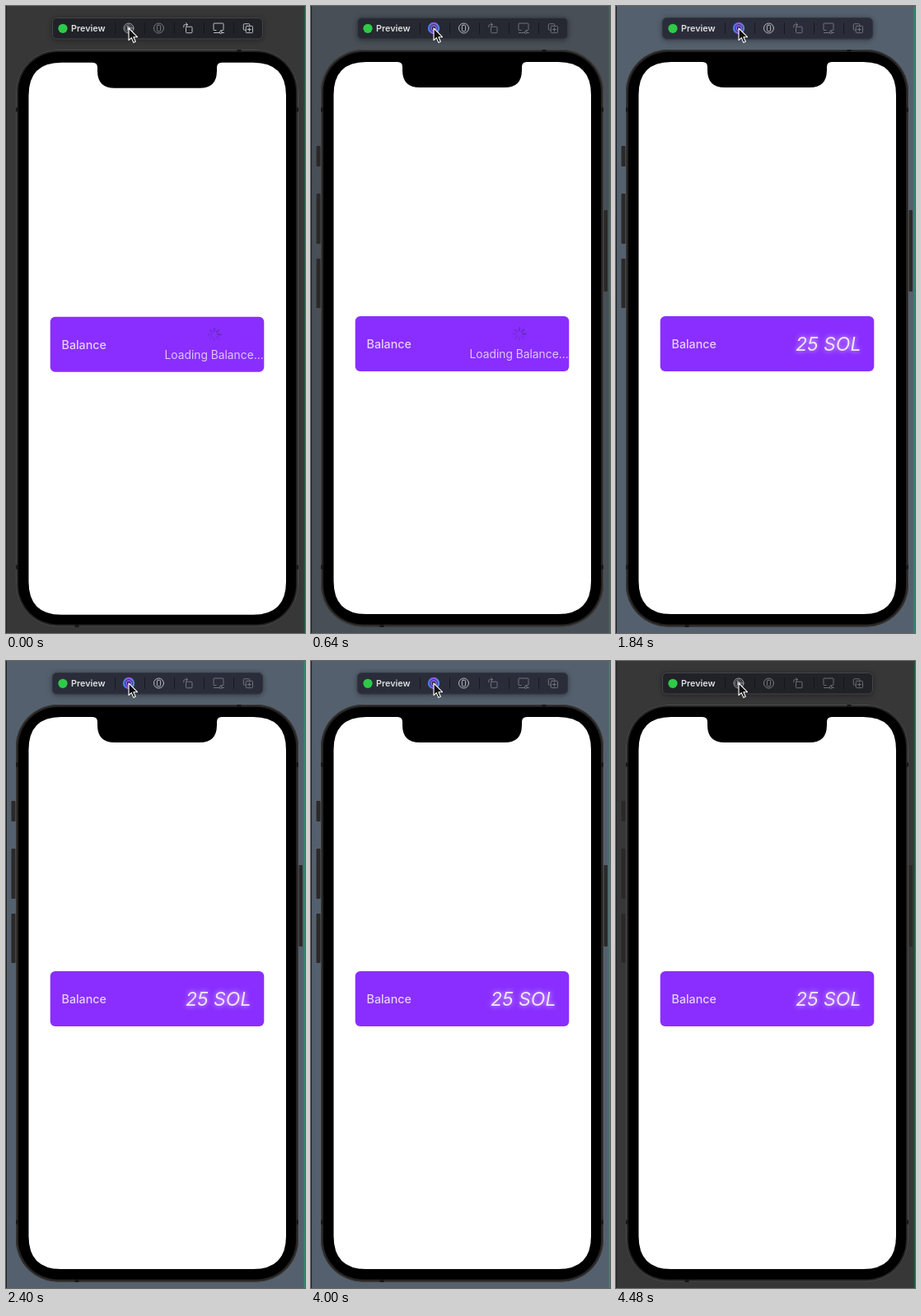
An HTML page for the animation above (4560 ms loop, 363 px wide and 762 px high).

```html
<!DOCTYPE html>
<html lang="en">
<head>
<meta charset="utf-8">
<title>Balance preview</title>
<style>
  html, body { margin: 0; width: 100%; height: 100%; overflow: hidden; background: #373737; }
  svg { display: block; width: 363px; height: 762px; font-family: Inter, Roboto, sans-serif; }
  .icon { fill: none; stroke: #d2d2d6; stroke-width: 1; stroke-linejoin: round; stroke-linecap: round; }
  #bar { filter: drop-shadow(0 1px 3px #0006); }
  #amount { filter: drop-shadow(0 0 3px #fffb); }
</style>
</head>
<body>
<svg viewBox="0 0 363 762">
  <defs>
    <linearGradient id="livePaint" x2="1" y2="0">
      <stop stop-color="#3c83ef"/><stop offset=".5" stop-color="#9b50ed"/><stop offset="1" stop-color="#4c91dc"/>
    </linearGradient>
  </defs>

  <rect id="backdrop" width="363" height="762"/>
  <path d="M.5 0V762" stroke="#202225"/>
  <path id="rightEdge" d="M362.3 0V762" stroke-width="1.4"/>

  <g id="bar">
    <rect id="barBox" x="56.5" y="14.5" width="255" height="25.5" rx="5"/>
  </g>
  <path d="M132.5 20v14M168.5 20v14M204.5 20v14M240.5 20v14M276.5 20v14" stroke="#111318" opacity=".75"/>
  <circle cx="69" cy="27.3" r="5.6" fill="#2fca48"/>
  <text x="79" y="31" font-size="10.8" font-weight="600" fill="#dededf">Preview</text>

  <g id="play" class="icon" opacity=".72">
    <circle cx="149" cy="27" r="6"/><circle cx="149" cy="27" r="4.1" stroke-width=".7"/>
    <path d="M147.6 24.7v4.6l4-2.3z" fill="#d2d2d6"/>
  </g>
  <g id="stop">
    <circle cx="149" cy="27" r="7.2" fill="url(#livePaint)"/>
    <circle cx="149" cy="27" r="4.4" fill="none" stroke="#35365c" stroke-width="1"/>
    <rect x="147" y="25" width="4" height="4" rx=".5" fill="#292b48"/>
  </g>
  <g id="device" class="icon">
    <circle cx="185.5" cy="27" r="6"/><rect x="183.4" y="23.3" width="4.2" height="7.4" rx="1"/>
  </g>
  <g id="tools" class="icon">
    <rect x="218.5" y="25.2" width="7.5" height="7.5" rx="1"/>
    <path d="M215.8 25.8v-1.6q0-1.7 1.7-1.7h3m-2-2 2 2-2 2"/>
    <path d="M255 29.5h-2.2q-.8 0-.8-.8v-6.9q0-.8.8-.8h10.4q.8 0 .8.8v6.9q0 .8-.8.8H261M252.5 32.5h7m3 0h2"/>
    <circle cx="260.8" cy="32" r="1.5"/>
    <path d="M291 29.2h-1.7q-1 0-1-1v-5.5q0-1 1-1h5.5q1 0 1 1v1.5"/>
    <rect x="291.3" y="24.4" width="8.2" height="8.2" rx="1"/><path d="M295.4 26.5v4m-2-2h4"/>
  </g>

  <g id="buttons" fill="#2b2928">
    <rect x="6.5" y="170" width="5" height="25" rx="1"/>
    <rect x="6.5" y="228" width="5" height="61" rx="1"/>
    <rect x="6.5" y="307" width="5" height="60" rx="1"/>
    <rect x="355.5" y="248" width="4.5" height="99" rx="1"/>
  </g>
  <rect x="12" y="53" width="343" height="701.5" rx="51" fill="#252322"/>
  <rect id="rim" x="12.5" y="53.5" width="342" height="700.5" rx="50.5" fill="none"/>
  <path d="M12 126h4M351 126h4M12 682h4M351 682h4M283 53v4M86 751v4" stroke="#171717" stroke-width="5"/>
  <rect x="15" y="56" width="337" height="695.5" rx="48" fill="#000"/>

  <g id="screen">
    <path d="M67 68H105Q111 68 111 74V78Q111 99 132 99H235Q256 99 256 78V74Q256 68 262 68H300Q340 68 340 108V699Q340 739 300 739H67Q27.500 739 27.500 699V108Q27.500 68 67 68Z" fill="#fff"/>
    <rect x="53.700" y="377" width="259.600" height="67" rx="6" fill="#892eff"/>
    <text x="67.500" y="416" font-size="14.3" font-weight="500" fill="#e5d1ff">Balance</text>
    <g id="loading">
      <g id="spinner" stroke="#342458" stroke-width="2" stroke-linecap="round"></g>
      <text x="192.500" y="428" font-size="13.8" fill="#dfc6ff">Loading Balance...</text>
    </g>
    <text id="amount" x="218" y="419" font-size="23" font-style="italic" fill="#f0e4ff">25 SOL</text>
  </g>

  <path d="M149 27v14.600l3.300-3 2.500 5.800 2.500-1.100-2.400-5.600h4.600z" fill="#111" stroke="#fff" stroke-width="1.100" stroke-linejoin="round"/>
</svg>
<script>
const LOOP = 4560;
const RUN_START = 480, LIVE_START = 640, LOADED = 1680, RUN_END = 4400;
const SPOKES = 8;
const $ = id => document.getElementById(id);

const smooth = (t, from, to) => {
  const p = Math.min(1, Math.max(0, (t - from) / (to - from)));
  return p * p * (3 - 2 * p);
};
const mix = (a, b, p) => `rgb(${a.map((v, i) => Math.round(v + (b[i] - v) * p))})`;
const show = (id, on) => $(id).setAttribute("visibility", on ? "visible" : "hidden");
const set = (id, name, value) => $(id).setAttribute(name, value);

const spokes = Array.from({ length: SPOKES }, (_, i) => {
  const line = document.createElementNS("http://www.w3.org/2000/svg", "path");
  line.setAttribute("d", "M0-4V-7.5");
  line.setAttribute("transform", `translate(253 398.500) rotate(${i * 360 / SPOKES})`);
  return $("spinner").appendChild(line);
});

function render(t) {
  const glow = smooth(t, 320, 900) * (1 - smooth(t, 4040, 4480));
  const running = t >= RUN_START && t < RUN_END;
  const live = t >= LIVE_START;
  const loaded = t >= LOADED;

  set("backdrop", "fill", mix([55, 55, 55], [84, 96, 109], glow));
  set("rightEdge", "stroke", mix([31, 87, 61], [47, 139, 111], glow));
  set("barBox", "fill", mix([33, 34, 40], [42, 45, 57], glow));
  set("barBox", "stroke", mix([68, 68, 72], [49, 54, 66], glow));
  set("rim", "stroke", mix([77, 77, 77], [61, 57, 55], glow));

  show("play", !running);
  show("stop", running);
  set("device", "opacity", running ? 0.85 : 0.5);
  set("tools", "opacity", live ? 0.42 : 0.88);
  show("buttons", live);
  set("screen", "transform", `translate(0 ${live ? 0 : 0.7})`);
  show("loading", !loaded);
  show("amount", loaded);

  const head = 2 + (live ? Math.floor((t - LIVE_START) / 125) : 0);
  spokes.forEach((line, i) => {
    const age = (((head - i) % SPOKES) + SPOKES) % SPOKES;
    line.setAttribute("opacity", Math.max(0.13, 0.42 - age * 0.06));
  });
}

const start = performance.now();
function tick() {
  render((performance.now() - start) % LOOP);
  requestAnimationFrame(tick);
}
tick();
</script>
</body>
</html>
```
